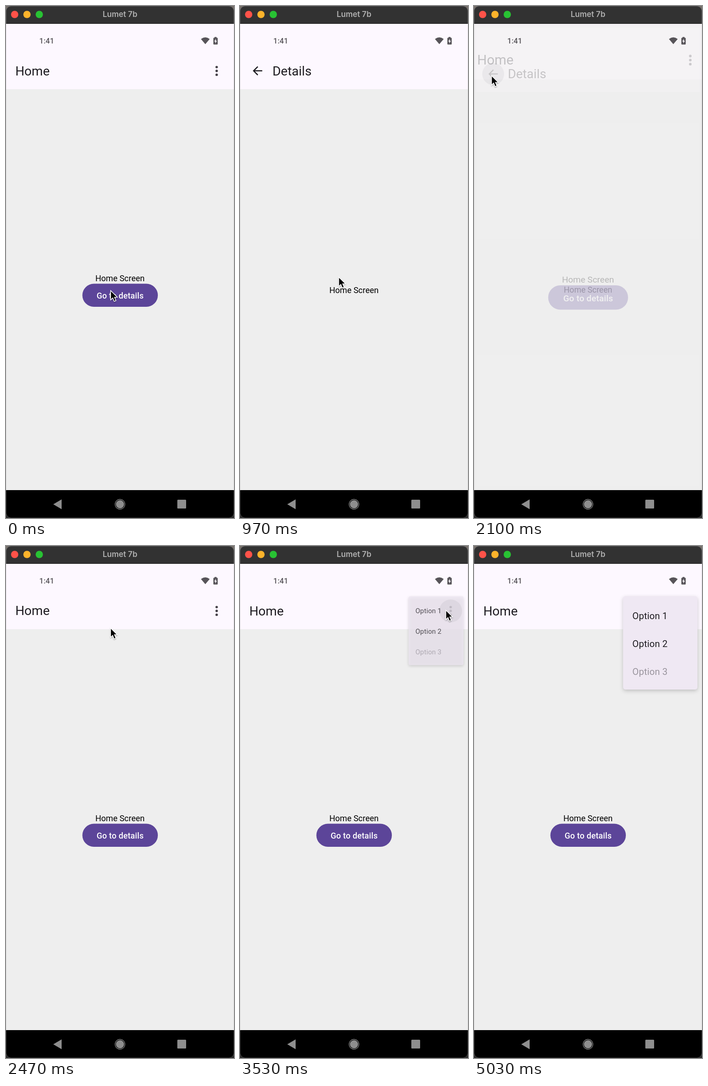
Write an HTML page that moves like this. It is 500 px wide and 1120 px high and loops after 5060 ms.

```html
<!DOCTYPE html>
<html lang="en">
<head>
<meta charset="utf-8">
<title>Stack navigation with a menu</title>
<style>
  html, body { margin: 0; width: 100%; height: 100%; overflow: hidden; background: #2a2a2a; }
  svg { display: block; width: 100%; height: 100%; }
  text { font-family: Roboto, sans-serif; fill: #1d1b20; }
  .heading { font-size: 28px; }
  .label { font-size: 18px; fill: #000; text-anchor: middle; }
  .option { font-size: 20.3px; letter-spacing: .15px; }
  .status, .status text { fill: #575459; }
</style>
</head>
<body>
<svg viewBox="0 0 500 1120" preserveAspectRatio="none">
  <defs>
    <clipPath id="windowClip"><rect width="500" height="1120" rx="11"/></clipPath>
    <clipPath id="screenClip"><rect y="39" width="500" height="1020"/></clipPath>
    <clipPath id="buttonClip"><rect x="167.5" y="607.5" width="165.5" height="50.5" rx="25.2"/></clipPath>
    <radialGradient id="glow">
      <stop offset=".6" stop-color="#fff"/>
      <stop offset="1" stop-color="#fff" stop-opacity=".2"/>
    </radialGradient>
    <filter id="blur" x="-20%" y="-20%" width="140%" height="140%"><feGaussianBlur stdDeviation="4"/></filter>
    <filter id="cursorShadow" x="-50%" y="-50%" width="200%" height="200%">
      <feDropShadow dx="0" dy="1.5" stdDeviation="1.2" flood-opacity=".35"/>
    </filter>
  </defs>

  <rect width="500" height="39" fill="#77716b"/>
  <g clip-path="url(#windowClip)">
    <rect width="500" height="1120" fill="#eee"/>

    <g clip-path="url(#screenClip)">
      <g id="home">
        <rect y="39" width="500" height="1020" fill="#eee"/>
        <rect y="39" width="500" height="143" fill="#fdf8ff"/>
        <text class="heading" x="20.4" y="151.5">Home</text>
        <circle id="menuRipple" cx="462" cy="142" r="25"/>
        <g fill="#454148">
          <circle cx="462" cy="133.6" r="2.7"/>
          <circle cx="462" cy="142" r="2.7"/>
          <circle cx="462" cy="150.4" r="2.7"/>
        </g>
        <text class="label" x="250" y="602.3">Home Screen</text>
        <g clip-path="url(#buttonClip)">
          <rect x="167" y="607" width="167" height="52" fill="#5c4599"/>
          <circle id="buttonRipple" cx="224" cy="624" fill="url(#glow)"/>
        </g>
        <text class="label" x="250.3" y="640.3" style="fill:#fff;font-weight:500;letter-spacing:.13px">Go to details</text>
      </g>

      <g id="details">
        <rect y="39" width="500" height="1020" fill="#eee"/>
        <rect y="39" width="500" height="143" fill="#fdf8ff"/>
        <circle id="backRipple" cx="38.5" cy="142" r="25"/>
        <path d="M48.8 141.8H30.5M39 132.6L29.8 141.8L39 151" fill="none" stroke="#1d1b20" stroke-width="2.5"/>
        <text class="heading" x="71.2" y="151.5">Details</text>
        <text class="label" x="250" y="628">Home Screen</text>
      </g>

      <g id="menu">
        <rect x="327" y="113" width="163" height="204" rx="5" fill="#000" fill-opacity=".2" filter="url(#blur)"/>
        <rect x="327" y="110" width="163" height="204" rx="5" fill="#efe8f3"/>
        <text class="option" x="347.3" y="159.6">Option 1</text>
        <text class="option" x="347.3" y="220.6">Option 2</text>
        <text class="option" x="347.3" y="281.6" style="fill:#9a959e">Option 3</text>
      </g>

      <g class="status">
        <text x="73" y="82" font-size="16.5" font-weight="500">1:41</text>
        <path d="M427.5 72.2Q437 64.8 446.7 72.2L437.1 83.6Z"/>
        <path d="M457.3 69.5V67.8H461.7V69.5H463Q464.3 69.5 464.3 71V82.7Q464.3 84.2 463 84.2H456Q454.7 84.2 454.7 82.7V71Q454.7 69.5 456 69.5Z"/>
        <path d="M460.2 71.8L456.7 77.8H458.9V82L462.4 76H460.2Z" fill="#fdf8ff"/>
      </g>
    </g>

    <rect width="500" height="39" fill="#323232"/>
    <rect y="38" width="500" height="1" fill="#1c1c1c"/>
    <circle cx="19" cy="18.5" r="8" fill="#ff5249"/>
    <circle cx="46" cy="18.5" r="8" fill="#fdb32b"/>
    <circle cx="73" cy="18.5" r="8" fill="#28c233"/>
    <text x="250" y="24.3" text-anchor="middle" style="font:600 17px Inter,sans-serif;fill:#b0b0b0">Lumet 7b</text>

    <rect y="1059" width="500" height="61" fill="#000"/>
    <g fill="#8e8e8e">
      <path d="M103.7 1090L122 1079.3V1100.7Z"/>
      <circle cx="250" cy="1090" r="9"/>
      <circle cx="250" cy="1090" r="10.8" fill="none" stroke="#8e8e8e" stroke-width="1.2"/>
      <rect x="375.7" y="1080" width="19.3" height="19.3" rx="1.5"/>
    </g>
    <rect x=".5" y=".5" width="499" height="1119" rx="10.5" fill="none" stroke="#aaa" stroke-opacity=".3"/>
  </g>

  <path id="cursor" d="M0 0V20.3L4.6 16L7.7 23.6L11.6 22L8.5 14.6H14.6Z"
        fill="#000" stroke="#fff" stroke-width="1.4" filter="url(#cursorShadow)"/>
</svg>

<script>
const LOOP = 5060;
const OPEN_AT = 570, CLOSE_AT = 2078, MENU_AT = 3413;
const el = id => document.getElementById(id);
const clamp = v => Math.min(1, Math.max(0, v));

function bezier(x1, y1, x2, y2) {
  const curve = (s, a, b) => 3 * (1 - s) ** 2 * s * a + 3 * (1 - s) * s * s * b + s ** 3;
  return x => {
    if (x <= 0 || x >= 1) return clamp(x);
    let low = 0, high = 1;
    for (let i = 0; i < 24; i++) {
      const mid = (low + high) / 2;
      if (curve(mid, x1, x2) < x) low = mid; else high = mid;
    }
    return curve(low, y1, y2);
  };
}
const cardEase = bezier(.20833, .82, .25, 1);
const menuEase = bezier(.4, 0, .2, 1);

// Pointer path: time, x, y of the tip
const pointer = [
  [0, 229.5, 622.5], [30, 229.5, 622.5], [200, 221, 621.5], [920, 220.5, 621.5],
  [1030, 212, 560], [1200, 172, 350], [1300, 140, 252], [1400, 108, 199],
  [1460, 72, 178], [1530, 45, 165], [1640, 39, 154], [1720, 38.5, 152.5],
  [2160, 38.5, 152.5], [2260, 75, 160], [2470, 228.5, 179.5], [2640, 370, 172],
  [2780, 438, 150], [2920, 451.5, 140.5], [4120, 451.5, 140.5], [4300, 425, 152],
  [4580, 390, 156], [4680, 386, 110], [4800, 380, 14]
];
const POINTER_END = 4800;

function pointerAt(t) {
  const i = Math.max(1, pointer.findIndex(k => k[0] > t));
  const [t0, x0, y0] = pointer[i - 1], [t1, x1, y1] = pointer[i];
  const k = (t - t0) / (t1 - t0);
  return [x0 + (x1 - x0) * k, y0 + (y1 - y0) * k];
}

function setCard(id, scale, opacity) {
  const card = el(id);
  card.setAttribute('transform', `translate(250 549) scale(${scale}) translate(-250 -549)`);
  card.setAttribute('opacity', opacity);
}

function setRipple(id, t, press, release, strength, fullRadius) {
  const ripple = el(id);
  const grow = clamp((t - press) / 150);
  const fade = clamp((t - press) / 75) * (1 - clamp((t - release) / 250));
  ripple.setAttribute('r', fullRadius * (.4 + .6 * grow ** .6));
  ripple.setAttribute('opacity', strength * fade);
}

function draw(t) {
  const closing = t >= CLOSE_AT;
  const p = closing ? 1 - cardEase((t - CLOSE_AT) / 400) : cardEase((t - OPEN_AT) / 400);
  setCard('home', 1 + .075 * p, clamp((1 - p) / .7925));
  setCard('details', closing ? .925 + .075 * p : .85 + .15 * p, clamp((p - .75) / .125));

  setRipple('buttonRipple', t, 470, 620, .22, 135);
  setRipple('backRipple', t, 1960, 2130, .2, 25);
  setRipple('menuRipple', t, 3310, 3540, .2, 25);

  const m = menuEase((t - MENU_AT) / 250);
  const menu = el('menu');
  menu.setAttribute('transform', `translate(490 110) scale(${m}) translate(-490 -110)`);
  menu.setAttribute('visibility', m > 0 ? 'visible' : 'hidden');
  // Parts fade separately so the shadow shows through the surface
  for (const part of menu.children) part.setAttribute('opacity', m);

  const shown = t < POINTER_END;
  el('cursor').setAttribute('visibility', shown ? 'visible' : 'hidden');
  if (shown) el('cursor').setAttribute('transform', `translate(${pointerAt(t)})`);
}

const start = performance.now();
function tick() {
  draw((performance.now() - start) % LOOP);
  requestAnimationFrame(tick);
}
tick();
</script>
</body>
</html>
```
